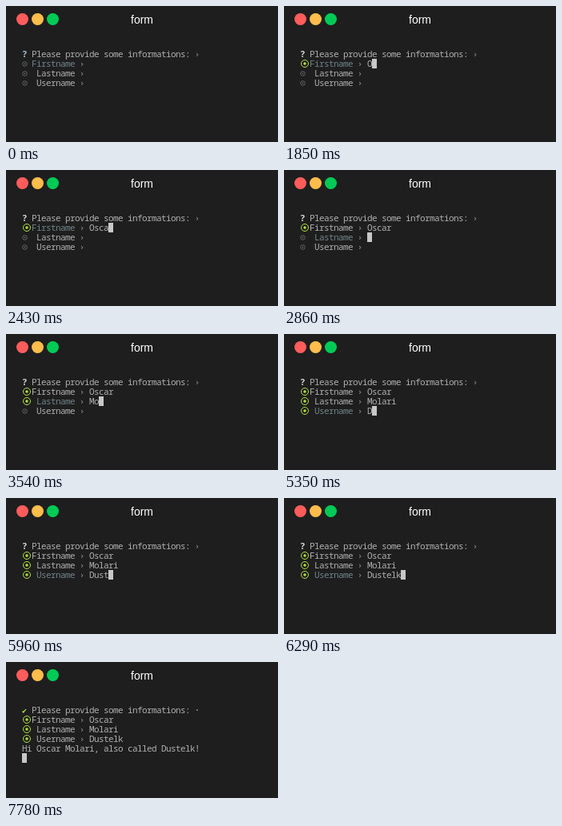
An HTML page with a canvas that plays this animation: 340x170 px, repeating every 8.29 s.

```html
<!DOCTYPE html>
<html lang="en">
<head>
<meta charset="utf-8">
<title>form</title>
<style>
  html, body { margin: 0; width: 100%; height: 100%; overflow: hidden; background: #1e1e1e; }
  canvas { display: block; }
</style>
</head>
<body>
<canvas id="stage" width="340" height="170"></canvas>
<script>
const ctx = document.getElementById('stage').getContext('2d', { alpha: false });
const LOOP = 8290, DONE = 7780;
const CELL = 6, LINE = 12, LEFT = 20, TOP = 54;
const MONO = '11px "Noto Sans Mono", "DejaVu Sans Mono", monospace';
const SYMBOL = 'bold 10px "DejaVu Sans Mono", "DejaVu Sans", monospace';
const FG = '#afafaf', DIM = '#626566', MARK = '#808383', ACTIVE = '#708387';
const GREEN = '#b3e33b', CURSOR = '#c7c7c7';

// Each field: label, value, time it gains focus, time of every keystroke
const fields = [
  { label: 'Firstname', value: 'Oscar', focus: 0, keys: [1850, 2110, 2330, 2420, 2510] },
  { label: ' Lastname', value: 'Molari', focus: 2860, keys: [3300, 3540, 3720, 3800, 3870, 3950] },
  { label: ' Username', value: 'Dustelk', focus: 4620, keys: [5350, 5600, 5680, 5960, 6050, 6130, 6290] }
];

function text(str, col, row, color, font = MONO) {
  ctx.font = font;
  ctx.letterSpacing = font === SYMBOL ? '0px' : '-0.6px';
  ctx.fillStyle = color;
  ctx.fillText(str, LEFT + col * CELL, TOP + row * LINE + 10);
}

function disc(x, y, r, color) {
  ctx.fillStyle = color;
  ctx.beginPath();
  ctx.arc(x, y, r, 0, 7);
  ctx.fill();
}

function bullet(x, y, r, dot, color) {
  ctx.strokeStyle = color;
  ctx.lineWidth = 1;
  ctx.beginPath();
  ctx.arc(x, y, r, 0, 7);
  ctx.stroke();
  disc(x, y, dot, color);
}

function cursor(col, row) {
  ctx.fillStyle = CURSOR;
  ctx.fillRect(LEFT + col * CELL, TOP + row * LINE, CELL, LINE);
}

function windowBar() {
  ctx.fillStyle = '#1e1e1e';
  ctx.fillRect(0, 0, 340, 170);
  ['#ff5c5c', '#ffbd4c', '#00ca56'].forEach((c, i) => disc(20.5 + 19 * i, 16.5, 7.5, c));
  ctx.font = '14px "Liberation Sans", Arial, sans-serif';
  ctx.letterSpacing = '0px';
  ctx.fillStyle = '#fff';
  ctx.textAlign = 'center';
  ctx.fillText('form', 170, 22);
  ctx.textAlign = 'left';
}

function draw(t) {
  const done = t >= DONE;
  const current = fields.filter(f => t >= f.focus).length - 1;
  windowBar();

  if (done) text('✔', 0, 0, GREEN, SYMBOL);
  else text('?', 0, 0, t < 1850 ? '#a0c0d8' : '#d5d5d0', 'bold ' + MONO);
  text('Please provide some informations:', 2, 0, FG);
  text(done ? '·' : '›', 36, 0, MARK, SYMBOL);

  fields.forEach((f, i) => {
    const row = i + 1, y = TOP + row * LINE + 6;
    const typed = f.keys.filter(k => t >= k).length;
    const active = !done && i === current;
    if (typed) bullet(26, y, 4.5, 1.7, GREEN);
    else bullet(23.5, y + 0.5, 2.8, 0.9, DIM);
    text(f.label, 2, row, active ? ACTIVE : FG);
    text('›', 12, row, MARK, SYMBOL);
    text(f.value.slice(0, typed), 14, row, FG);
    if (active && t >= 1850) cursor(14 + typed, row);
  });

  if (done) {
    const [first, last, user] = fields.map(f => f.value);
    text(`Hi ${first} ${last}, also called ${user}!`, 0, 4, FG);
    cursor(0, 5);
  }
}

function tick() {
  draw(performance.now() % LOOP);
  requestAnimationFrame(tick);
}
tick();
</script>
</body>
</html>
```
